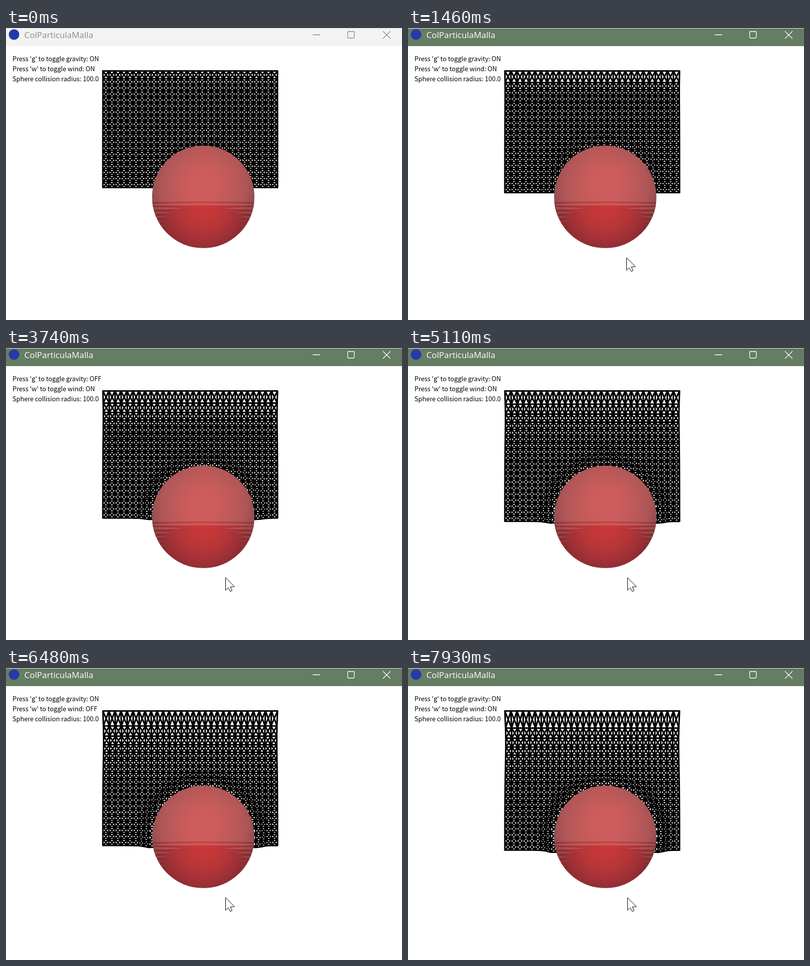
Recreate the animation shown at these times as an HTML page with a canvas. Size 789 by 581 pixels, loop 8 s.

```html
<!DOCTYPE html>
<html lang="en">
<head>
<meta charset="utf-8">
<title>ColParticulaMalla</title>
<style>
  html, body { margin: 0; width: 100%; height: 100%; overflow: hidden; background: #fff; }
  canvas { display: block; }
</style>
</head>
<body>
<canvas id="stage" width="789" height="581"></canvas>
<script>
const ctx = document.getElementById('stage').getContext('2d');
const LOOP = 8000;
const COLS = 30, ROWS = 20, CELL = 12, LEFT = 193, TOP = 85.5;
const BALL = { x: 393, y: 336, r: 102 };
const GRAVITY_OFF = 2450, GRAVITY_ON = 4100, WIND_OFF = 5500, WIND_ON = 7050;

const ramp = (t, t0, t1) => Math.min(1, Math.max(0, (t - t0) / (t1 - t0)));
const smooth = u => u * u * (3 - 2 * u);

// The cloth falls steadily, slowly while gravity is off, then picks up again.
function sag(t) {
  return 17 * ramp(t, 0, GRAVITY_OFF)
    + 5 * ramp(t, GRAVITY_OFF, GRAVITY_ON)
    + 23 * ramp(t, GRAVITY_ON, 7930) ** 1.08;
}

function clothPoints(t) {
  const p = t / LOOP;
  const stretch = 317.3 + sag(t) - TOP - CELL * (ROWS - 1);
  const share = 0.45 + 0.47 * Math.exp(-((t / 2500) ** 2.2));
  const ratio = 0.2 + 0.5 * p ** 0.8;
  const out = 0.5 + 5 * p ** 0.8;
  const down = 3.2 * smooth(ramp(t, 1460, 4400));
  const grid = [];
  for (let j = 0; j < ROWS; j++) {
    const extra = j ? stretch * (1 - (1 - share) * ratio ** (j - 1)) : 0;
    const y0 = TOP + CELL * j + extra;
    const waist = stretch / 48 * 1.9 * (j / 2.5) * Math.exp(1 - j / 2.5);
    const row = [];
    for (let i = 0; i < COLS; i++) {
      const u = 2 * i / (COLS - 1) - 1;
      const x0 = LEFT + CELL * i - u * waist;
      const dx = x0 - BALL.x, dy = y0 - BALL.y;
      const d = Math.hypot(dx, dy) || 1;
      const near = Math.exp(-(((d - BALL.r) / 18) ** 2));
      const below = ramp(dy, -30, 0);
      row.push([x0 + dx / d * out * near, y0 + (dy / d * out + down * below) * near]);
    }
    grid.push(row);
  }
  return grid;
}

function drawCloth(t) {
  const grid = clothPoints(t);
  const link = (a, b) => { ctx.moveTo(...a); ctx.lineTo(...b); };
  ctx.beginPath();
  for (let j = 0; j < ROWS; j++) {
    for (let i = 0; i < COLS; i++) {
      const right = i + 1 < COLS, under = j + 1 < ROWS;
      if (right) link(grid[j][i], grid[j][i + 1]);
      if (under) link(grid[j][i], grid[j + 1][i]);
      if (right && under) {
        link(grid[j][i], grid[j + 1][i + 1]);
        link(grid[j][i + 1], grid[j + 1][i]);
      }
    }
  }
  ctx.strokeStyle = '#000';
  ctx.lineWidth = 3.1;
  ctx.lineCap = 'round';
  ctx.stroke();
}

function radial(x, y, r, ...colors) {
  const g = ctx.createRadialGradient(x, y, 0, x, y, r);
  colors.forEach((c, i) => g.addColorStop(i / (colors.length - 1), c));
  return g;
}

// A horizontal band across the ball whose edges bow upwards in the middle.
function drawBand(y0, y1, bow, fill) {
  const { x, r } = BALL;
  ctx.fillStyle = fill;
  ctx.beginPath();
  ctx.moveTo(x - r, y0);
  ctx.quadraticCurveTo(x, y0 - bow, x + r, y0);
  ctx.lineTo(x + r, y1);
  ctx.quadraticCurveTo(x, y1 - bow, x - r, y1);
  ctx.fill();
}

function drawBall() {
  const { x, y, r } = BALL;
  const light = radial(x, 312, 112, '#d05d5d', '#cd5c5c', '#c05a5a', '#b05657', '#8a4a4b');
  const deep = radial(x, 352, 104, '#c93939', '#c23737', '#b43539', '#9b3035', '#7a272d');
  ctx.save();
  ctx.beginPath();
  ctx.arc(x, y, r, 0, Math.PI * 2);
  ctx.clip();
  ctx.fillStyle = light;
  ctx.fillRect(x - r, y - r, 2 * r, 2 * r);
  drawBand(347, y + r, 3, deep);
  drawBand(349, 354, 2, light);

  // Pale wedges that narrow from the rim towards the middle.
  for (let k = 0; k < 6; k++) {
    const top = 356 + 9 * k, thick = 5.5 - 0.8 * k, reach = 74 - 36 * 0.3 ** k;
    for (const side of [-1, 1]) {
      ctx.beginPath();
      ctx.moveTo(x + side * r, top - 0.5);
      ctx.lineTo(x + side * reach, top + thick / 2);
      ctx.lineTo(x + side * r, top + thick + 0.5);
      ctx.fill();
    }
  }
  ctx.restore();
}

function drawTitleBar(active) {
  const ink = active ? '#fff' : '#8d8d8d';
  ctx.fillStyle = active ? '#647d63' : '#f3f3f3';
  ctx.fillRect(0, 0, 789, 36);
  ctx.fillStyle = '#dedede';
  ctx.fillRect(0, 0, 789, 1);
  ctx.fillStyle = '#2639a9';
  ctx.beginPath();
  ctx.arc(16, 13, 10.5, 0, Math.PI * 2);
  ctx.fill();
  ctx.fillStyle = ink;
  ctx.font = '17px "Open Sans", "Noto Sans", sans-serif';
  ctx.fillText('ColParticulaMalla', 36.5, 20);

  ctx.strokeStyle = ink;
  ctx.lineCap = 'butt';
  ctx.lineWidth = 1.3;
  ctx.beginPath();
  ctx.moveTo(611, 13.5);
  ctx.lineTo(626, 13.5);
  ctx.roundRect(680.7, 7, 13.2, 13, 1.5);
  ctx.moveTo(751, 6.5);
  ctx.lineTo(766, 21);
  ctx.moveTo(766, 6.5);
  ctx.lineTo(751, 21);
  ctx.stroke();
}

function drawLabels(t) {
  const state = (off, on) => t < off || t >= on ? 'ON' : 'OFF';
  const lines = [
    "Press 'g' to toggle gravity: " + state(GRAVITY_OFF, GRAVITY_ON),
    "Press 'w' to toggle wind: " + state(WIND_OFF, WIND_ON),
    'Sphere collision radius: 100.0'
  ];
  ctx.fillStyle = '#000';
  ctx.font = '12.7px "Noto Sans CJK SC", "Noto Sans CJK JP", "Open Sans", sans-serif';
  lines.forEach((line, i) => ctx.fillText(line, 13, 66 + 20 * i));
}

function drawCursor(t) {
  if (t < 690) return;
  const rise = ramp(t, 690, 1200);
  const arrow = new Path2D('M0 0V24.5L5.3 19.5 9.3 27 13 25.3 9.6 18 17.3 17.3Z');
  ctx.save();
  ctx.beginPath();
  ctx.rect(0, 36, 789, 540);
  ctx.clip();
  ctx.translate(446.5 - 11 * rise + 2 * ramp(t, 1740, 2400), 566.5 - 109 * rise);
  ctx.fillStyle = '#fff';
  ctx.fill(arrow);
  ctx.strokeStyle = '#000';
  ctx.lineWidth = 1;
  ctx.stroke(arrow);
  ctx.restore();
}

function draw(t) {
  ctx.fillStyle = '#fff';
  ctx.fillRect(0, 0, 789, 581);
  drawTitleBar(t >= 1250);
  drawLabels(t);
  drawCloth(t);
  drawBall();
  drawCursor(t);
}

const start = performance.now();
function tick() {
  draw((performance.now() - start) % LOOP);
  requestAnimationFrame(tick);
}
tick();
</script>
</body>
</html>
```
